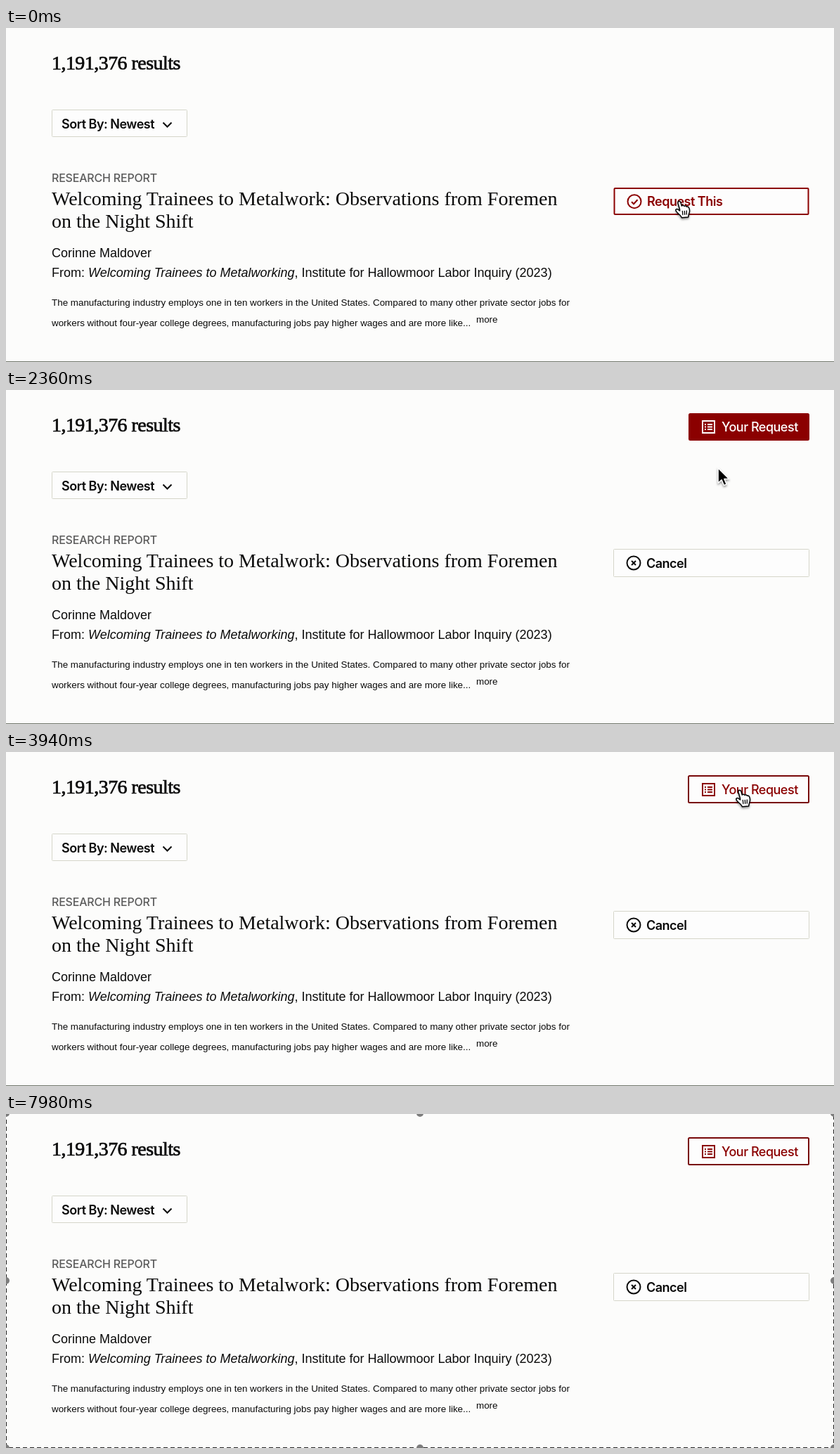
Recreate the animation shown at these times as an HTML page. Size 1178 px wide and 475 px high, loop 8000 ms.

```html
<!DOCTYPE html>
<html lang="en">
<head>
<meta charset="utf-8">
<title>Search results</title>
<style>
  html, body { margin: 0; width: 100%; height: 100%; overflow: hidden; background: #fcfcfb; }
  svg { display: block; width: 1178px; height: 475px; font-family: "Liberation Sans", Arial, sans-serif; }
  text { fill: #0a0a0a; white-space: pre; }
  .serif { font: 28px "Liberation Serif", Times, serif; }
  .count { letter-spacing: -.55px; stroke: #0a0a0a; stroke-width: .7px; }
  .ui { font: 600 18px Inter, sans-serif; letter-spacing: -.5px; }
  .kind { font: 500 16px Inter, sans-serif; letter-spacing: -.2px; fill: #5c5c5c; }
  .meta { font-size: 18px; }
  .small { font-size: 13.4px; }
  .line { fill: none; stroke-width: 2; }
  .btn { color: #0a0a0a; }
  .btn text { fill: currentColor; }
  .btn .line { stroke: currentColor; }
  #yours text { font-weight: 500; }
  #pointer { filter: drop-shadow(0 2px 1.5px #0006); }
</style>
</head>
<body>
<svg viewBox="0 0 1178 475">
  <rect width="1178" height="475" fill="#fcfcfb"/>
  <path id="edge" d="M0 474.500H1178" stroke="#70756a"/>

  <text class="serif count" x="65" y="58.500">1,191,376 results</text>

  <rect x="65.500" y="116.500" width="192" height="38" rx="1" fill="#fdfdfd" stroke="#d5d6ca"/>
  <text class="ui" x="79" y="143">Sort By: Newest</text>
  <path class="line" d="M223.500 134.500l6 6 6-6" stroke="#0a0a0a"/>

  <text class="kind" x="65" y="219">RESEARCH REPORT</text>
  <text class="serif" x="65" y="252">Welcoming Trainees to Metalwork: Observations from Foremen</text>
  <text class="serif" x="65" y="284">on the Night Shift</text>
  <text class="meta" x="65" y="326">Corinne Maldover</text>
  <text class="meta" x="65" y="354">From: <tspan font-style="italic">Welcoming Trainees to Metalworking</tspan>, Institute for Hallowmoor Labor Inquiry (2023)</text>
  <text class="small" x="65" y="395">The manufacturing industry employs one in ten workers in the United States. Compared to many other private sector jobs for</text>
  <text class="small" x="65" y="424">workers without four-year college degrees, manufacturing jobs pay higher wages and are more like...</text>
  <text class="small" x="669" y="419">more</text>

  <g id="request" class="btn">
    <rect id="requestBox" rx="1"/>
    <g id="requestFace">
      <circle class="line" cx="893" cy="246" r="9.500"/>
      <path id="requestIcon" class="line"/>
      <text id="requestText" class="ui" x="911" y="252.500"></text>
    </g>
  </g>

  <g id="yours" class="btn">
    <rect id="yoursBox" rx="1.500"/>
    <g id="yoursFace">
      <rect class="line" x="991" y="44" width="17" height="17"/>
      <path class="line" d="M994 49h2m2 0h7M994 52.500h2m2 0h7M994 56h2m2 0h7"/>
      <text class="ui" x="1018" y="59">Your Request</text>
    </g>
  </g>

  <g id="selection">
    <rect x=".5" y="-1" width="1177" height="475.500" fill="none" stroke="#222" stroke-dasharray="6 4"/>
    <g id="handles" fill="#7c7c7c"></g>
  </g>

  <g id="pointer" stroke-linejoin="round" stroke-linecap="round">
    <g id="hand" transform="translate(-7 -3)" stroke="#000" stroke-width="1.500">
      <path fill="#fff" d="M8.500 14L6 5.200Q5.600 2.400 7.800 2.200 9.400 2.200 10 4.400L11.300 9Q13.500 7.200 15 9.400 17 8 18.300 10.200 20.600 9.400 21.800 12 23.400 16.500 21.600 20L20.600 25 11.600 25.800Q10 22.600 5.500 19 2.600 16.600 2.800 14.600 4 12.800 6.200 14.200L8.600 16Z"/>
      <path fill="none" stroke-width="1.300" d="M12.300 16.500l.6 5M15.300 16.300l.4 5M18.300 16v5"/>
    </g>
    <path id="arrow" d="M0 0V21.500L5 17 8.300 24.800 12 23.200 8.800 15.600H15.500Z" fill="#000" stroke="#fff" stroke-width="1.500"/>
  </g>
</svg>
<script>
const LOOP = 8000, REQUESTED = 420, OPENED = 3500, SELECTED = 7000;
const RED = '#8b0000', INK = '#0a0a0a', PAPER = '#fdfdfd';
const CHECK = 'M889 246.500l3 3 5.500-6', CROSS = 'M890 243l6 6m0-6l-6 6';
const $ = id => document.getElementById(id);

// Pointer stops: time, x, y
const stops = [
  [0, 957, 247], [1700, 957, 247], [2360, 1013, 111],
  [2700, 1041, 60], [3100, 1041, 60], [3400, 1043, 55], [LOOP, 1043, 55]
];

$('handles').innerHTML = [0, 589, 1178].flatMap(x => [-1, 237, 475].map(y =>
  x === 589 && y === 237 ? '' : `<circle cx="${x}" cy="${y}" r="5"/>`)).join('');

const set = (id, attrs) => {
  for (const name in attrs) $(id).setAttribute(name, attrs[name]);
};
const show = (id, on) => set(id, { visibility: on ? 'visible' : 'hidden' });

// Box given by its outer edges, with the border inside
const box = (id, left, top, right, bottom, border, stroke, fill) => set(id, {
  x: left + border / 2, y: top + border / 2,
  width: right - left - border, height: bottom - top - border,
  'stroke-width': border, stroke, fill
});

function pointerAt(t) {
  const i = stops.findIndex(s => s[0] > t);
  const [t0, x0, y0] = stops[i - 1], [t1, x1, y1] = stops[i];
  const k = (t - t0) / (t1 - t0);
  return [x0 + (x1 - x0) * k, y0 + (y1 - y0) * k];
}

function draw(t) {
  const [x, y] = pointerAt(t);
  const requested = t >= REQUESTED, opened = t >= OPENED;
  const overRequest = y > 227 && y < 266, overYours = y > 33 && y < 72;

  $('request').style.color = overRequest ? RED : INK;
  if (overRequest) box('requestBox', 864.5, 227, 1142.5, 266, 2, RED, PAPER);
  else box('requestBox', 864, 226, 1143, 266, 1, '#d5d6ca', PAPER);
  set('requestFace', { transform: overRequest ? 'translate(1 .7)' : '' });
  set('requestIcon', { d: requested ? CROSS : CHECK });
  $('requestText').textContent = requested ? 'Cancel' : 'Request This';

  show('yours', requested);
  $('yours').style.color = opened ? RED : '#fff';
  const grow = overYours ? 1 : 0;
  box('yoursBox', 971 - grow, 33, 1143, 72 + grow, 2, opened ? '#780808' : RED, opened ? PAPER : RED);
  set('yoursFace', { transform: `translate(0 ${grow})` });

  const selected = t >= SELECTED, hand = overRequest || overYours;
  show('selection', selected);
  show('edge', !selected);
  show('hand', !selected && hand);
  show('arrow', !selected && !hand);
  set('pointer', { transform: `translate(${x} ${y})` });
}

const start = performance.now();
function tick() {
  draw((performance.now() - start) % LOOP);
  requestAnimationFrame(tick);
}
tick();
</script>
</body>
</html>
```
